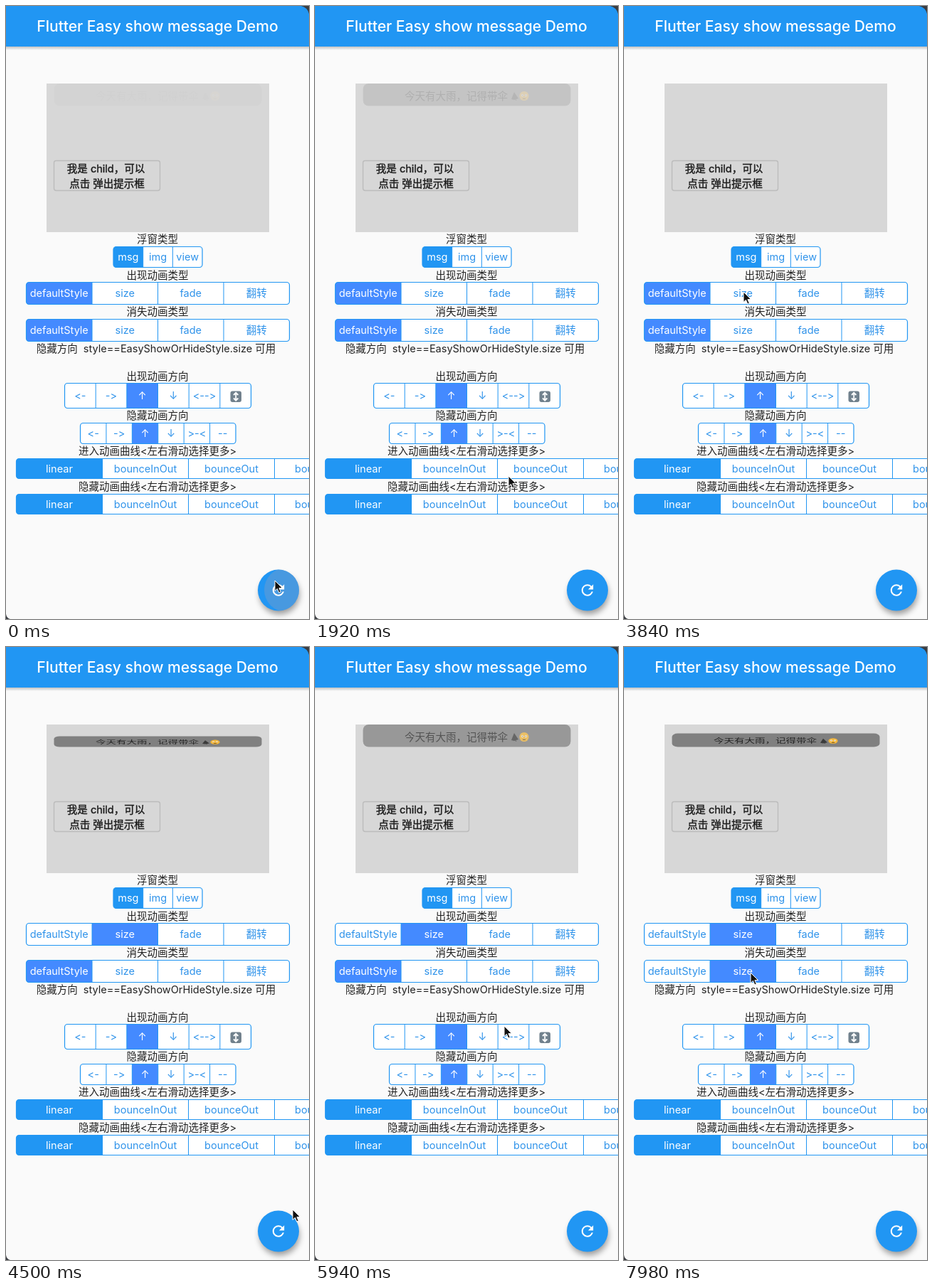
Write an HTML page that moves like this. It is 426x862 px and loops after 8 s.

```html
<!DOCTYPE html>
<html lang="zh-CN">
<head>
<meta charset="utf-8">
<title>Message demo</title>
<style>
  html, body { margin: 0; width: 100%; height: 100%; overflow: hidden; background: #fafafa; }
  svg { display: block; width: 426px; height: 862px; }
  text {
    font: 14.5px Inter, "Noto Sans CJK SC", "Noto Sans CJK", sans-serif;
    font-variant-ligatures: none; font-feature-settings: "calt" 0;
    text-anchor: middle; white-space: pre; fill: #222;
  }
  .bar { font-size: 21.05px; font-weight: 500; fill: #fff; }
  .child { fill: #1c1c1c; stroke: #1c1c1c; stroke-width: .4px; }
  .cell { fill: #2f93ea; }
  .cell.on { fill: #fff; }
</style>
</head>
<body>
<svg viewBox="0 0 426 862">
  <defs>
    <linearGradient id="shade" x2="0" y2="1">
      <stop stop-color="#000" stop-opacity=".22"/>
      <stop offset="1" stop-color="#000" stop-opacity="0"/>
    </linearGradient>
    <filter id="soft" x="-50%" y="-50%" width="200%" height="200%"><feGaussianBlur stdDeviation="4.5"/></filter>
    <clipPath id="fabClip"><circle cx="383" cy="821.5" r="29"/></clipPath>
  </defs>
  <rect width="426" height="862" fill="#fafafa"/>
  <rect y="57" width="426" height="5" fill="url(#shade)"/>
  <rect width="426" height="57" fill="#2196f3"/>
  <text class="bar" x="213" y="35.5">Flutter Easy show message Demo</text>

  <rect x="57" y="109" width="313" height="209" fill="#d7d7d7"/>
  <rect x="67.5" y="217.5" width="149" height="42" rx="3" fill="none" stroke="#bcbcbc" stroke-width="1.4"/>
  <text class="child" x="140.5" y="233.5">我是 child，可以</text>
  <text class="child" x="142" y="254.5">点击 弹出提示框</text>

  <g id="toast">
    <rect x="67.5" y="109" width="292" height="31.5" rx="8" fill="#808080"/>
    <text x="198.5" y="132">今天有大雨，记得带伞</text>
    <path d="M280 121L286 130L280 132L276 131Z" fill="#3b3b3b"/>
    <path d="M281 130L283 133" stroke="#3b3b3b"/>
    <circle cx="294" cy="126.5" r="6.6" fill="#f2b63c"/>
    <g fill="#fff"><circle cx="291.5" cy="125.5" r="1.5"/><circle cx="296.5" cy="125.5" r="1.5"/></g>
    <path d="M291.5 125v1M296.5 125v1M292 130.3h4" stroke="#59401c"/>
  </g>

  <g id="controls"></g>

  <rect x="315.5" y="541.5" width="15.5" height="15.5" rx="3" fill="#71818d"/>
  <path d="M323.2 544v10.5M320 547l3.2-3.2 3.2 3.2M320 551.5l3.2 3.2 3.2-3.2" fill="none" stroke="#fff" stroke-width="1.8"/>

  <circle cx="384.5" cy="827.5" r="28" fill="#000" opacity=".38" filter="url(#soft)"/>
  <circle cx="383" cy="821.5" r="29" fill="#2196f3"/>
  <circle id="ripple" cy="821" fill="#789bc8" clip-path="url(#fabClip)"/>
  <path transform="translate(370.6 809.1) scale(1.03)" fill="#fff"
    d="M17.65 6.35A7.96 7.96 0 0 0 12 4a8 8 0 1 0 7.73 10h-2.08A6 6 0 1 1 12 6c1.66 0 3.14.69 4.22 1.78L13 11h7V4z"/>

  <path d="M415 0Q424 2 426 11V0ZM0 855Q1 861 6 862H0Z" fill="#3a3d42"/>
  <path id="cursor" d="M0 0V14.5L3.4 11.4L5.8 17L8.3 16L5.9 10.6H10.6Z" fill="#111" stroke="#fff" stroke-width="1"/>
</svg>
<script>
const LOOP = 8000, STEP = 60;
const FADE = 500, HOLD = 1040;
const SIZE_IN_AT = 4260, SIZE_OUT_AT = 7680;
const BLUE = '#2196f3', ACCENT = '#448aff';

const $ = id => document.getElementById(id);
const clamp = v => Math.max(0, Math.min(1, v));

function add(tag, attrs, text = '') {
  const node = document.createElementNS('http://www.w3.org/2000/svg', tag);
  for (const key in attrs) node.setAttribute(key, attrs[key]);
  node.textContent = text;
  return $('controls').appendChild(node);
}

const label = (y, text, x = 213) => add('text', { x, y: y + 5.3 }, text);

// A segmented button row; returns a function that selects one cell.
function segments(x, y, width, height, names, color) {
  const w = width / names.length, bottom = y + height;
  add('rect', { x, y, width, height, rx: 4, fill: '#fff' });
  const fill = add('path', { fill: color });
  const lines = names.slice(1).map((_, i) => `M${x + w * (i + 1)} ${y}V${bottom}`).join('');
  add('path', { d: lines, stroke: BLUE });
  add('rect', { x, y, width, height, rx: 4, fill: 'none', stroke: BLUE, 'stroke-width': 1.2 });
  const texts = names.map((name, i) =>
    add('text', { class: 'cell', x: x + w * (i + .5), y: y + height / 2 + 5.2 }, name));
  return index => {
    const left = x + w * index, r = index ? 0 : 4;
    fill.setAttribute('d', `M${left + w} ${y}H${left + r}q${-r} 0 ${-r} ${r}V${bottom - r}q0 ${r} ${r} ${r}H${left + w}Z`);
    texts.forEach((t, i) => t.classList.toggle('on', i === index));
  };
}

const styles = ['defaultStyle', 'size', 'fade', '翻转'];
const curves = ['linear', 'bounceInOut', 'bounceOut', 'bounceIn'];

label(328, '浮窗类型');
segments(151, 338.5, 125, 29, ['msg', 'img', 'view'], BLUE)(0);
label(378.5, '出现动画类型');
const selectIn = segments(28.5, 388.5, 370, 31, styles, ACCENT);
label(430, '消失动画类型');
const selectOut = segments(28.5, 440.5, 370, 31, styles, ACCENT);
label(482, '隐藏方向  style==EasyShowOrHideStyle.size 可用', 211);
label(521, '出现动画方向');
segments(82.5, 530.5, 262, 35, ['<-', '->', '↑', '↓', '<-->', ''], ACCENT)(2);
label(576, '隐藏动画方向');
segments(104.5, 586.5, 218.5, 29, ['<-', '->', '↑', '↓', '>-<', '--'], ACCENT)(2);
label(626, '进入动画曲线<左右滑动选择更多>');
segments(14.5, 636.5, 484, 28, curves, BLUE)(0);
label(676, '隐藏动画曲线<左右滑动选择更多>');
segments(14.5, 686.5, 484, 28, curves, BLUE)(0);

// Pointer stops: time, x, y
const stops = [
  [0, 378, 808], [250, 378, 808], [1260, 289, 760], [2580, 255, 562],
  [3400, 168, 402], [4260, 168, 402], [4500, 403, 791], [4700, 410, 798],
  [5200, 380, 800], [5940, 266, 533], [6840, 178, 458], [LOOP, 178, 458]
];

function pointerAt(t) {
  const i = stops.findIndex(s => s[0] > t);
  const [t0, x0, y0] = stops[i - 1], [t1, x1, y1] = stops[i];
  const p = (t - t0) / (t1 - t0), e = p * p * (3 - 2 * p);
  return [x0 + (x1 - x0) * e, y0 + (y1 - y0) * e];
}

function drawToast(t) {
  const start = t >= SIZE_OUT_AT ? SIZE_OUT_AT : t >= SIZE_IN_AT ? SIZE_IN_AT : -15;
  const age = t - start;
  const shown = clamp(age / FADE);
  const left = 1 - clamp((age - FADE - HOLD) / FADE);
  const scale = start > 0 ? shown : 1;
  $('toast').setAttribute('opacity', start > 0 ? left : shown * left);
  $('toast').setAttribute('transform', `translate(0 ${140.5 * (1 - scale)}) scale(1 ${scale})`);
}

function draw(t) {
  selectIn(t < SIZE_IN_AT ? 0 : 1);
  selectOut(t < SIZE_OUT_AT ? 0 : 1);
  drawToast(t);
  const spread = clamp(t / 220);
  $('ripple').setAttribute('cx', 394 - 11 * spread);
  $('ripple').setAttribute('r', 31 + 4 * spread);
  $('ripple').setAttribute('opacity', .45 * (1 - spread));
  $('cursor').setAttribute('transform', `translate(${pointerAt(t)})`);
}

const begin = performance.now();
function tick() {
  const t = (performance.now() - begin) % LOOP;
  draw(Math.floor(t / STEP) * STEP);
  requestAnimationFrame(tick);
}
tick();
</script>
</body>
</html>
```
